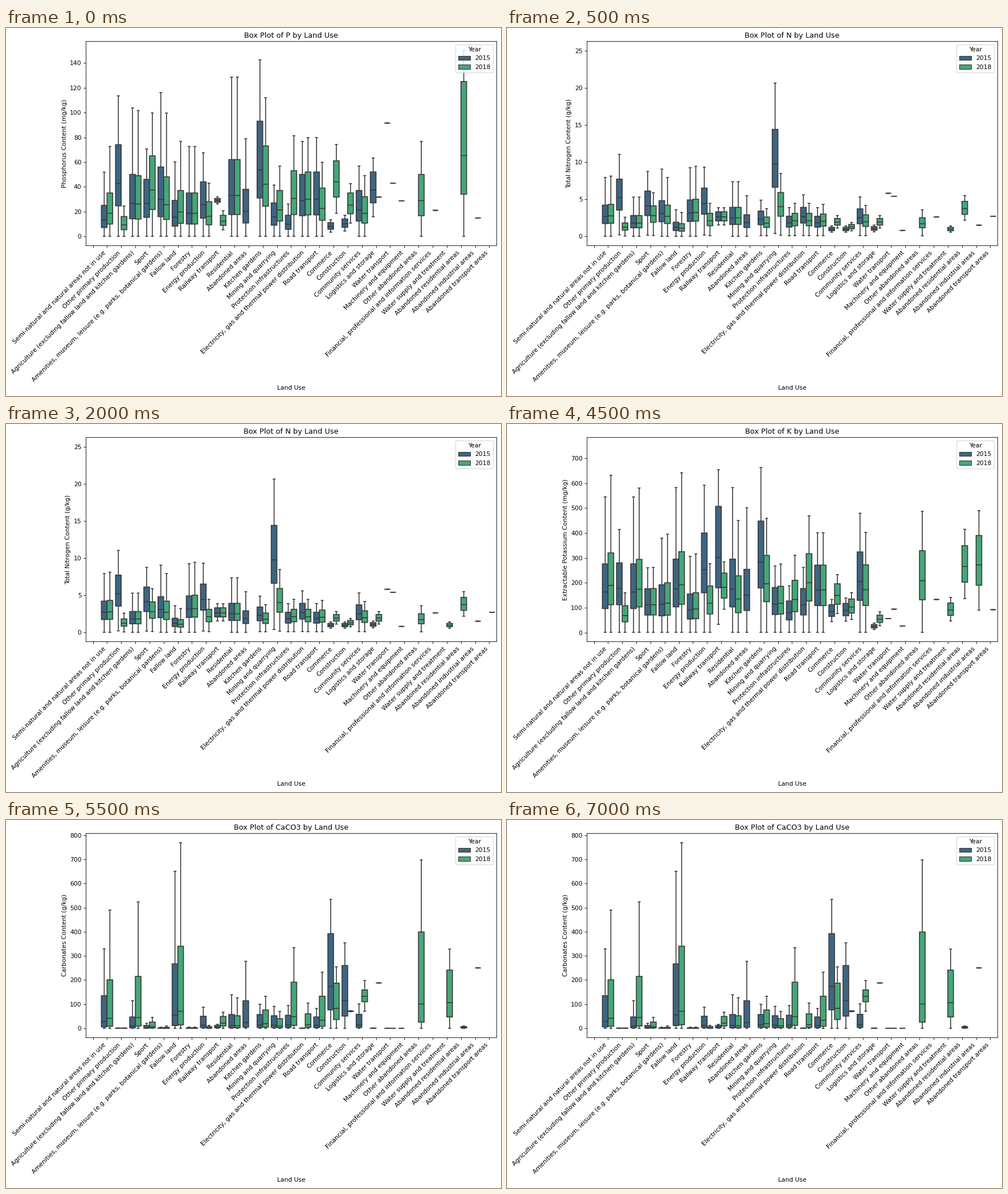
Recreate the animation shown at these times as a matplotlib script. Size 869 by 645 pixels, loop 8000 ms.

```python
import math

import matplotlib.pyplot as plt
from matplotlib.animation import FuncAnimation
from matplotlib.patches import Patch

W, H, DPI = 869, 645, 77.5
LEFT, BOTTOM, AX_W, AX_H = 140.1, 263.6, 720.7, 358.0
BLUE, GREEN, INK = "#3d6682", "#45a778", "#393939"

# How many samples a land use has decides the shape of its box:
# lower quartile as a share of the upper one, whisker reach in box heights.
MANY, SOME, FEW, ONE = (0.35, 1.5), (0.4, 0.8), (0.58, 0.45), (1.0, 0.5)

LAND_USES = [
    ("", ONE),
    ("Semi-natural and natural areas not in use", MANY),
    ("Other primary production", SOME),
    ("Agriculture (excluding fallow land and kitchen gardens)", MANY),
    ("Sport", SOME),
    ("Amenities, museum, leisure (e.g. parks, botanical gardens)", MANY),
    ("Fallow land", MANY),
    ("Forestry", MANY),
    ("Energy production", SOME),
    ("Railway transport", FEW),
    ("Residential", MANY),
    ("Abandoned areas", MANY),
    ("Kitchen gardens", SOME),
    ("Mining and quarrying", SOME),
    ("Protection infrastructures", SOME),
    ("Electricity, gas and thermal power distribution", SOME),
    ("Road transport", SOME),
    ("Commerce", FEW),
    ("Construction", FEW),
    ("Community services", SOME),
    ("Logistics and storage", FEW),
    ("Water transport", ONE),
    ("Machinery and equipment", ONE),
    ("Other abandoned areas", SOME),
    ("Financial, professional and information services", ONE),
    ("Water supply and treatment", FEW),
    ("Abandoned residential areas", FEW),
    ("Abandoned industrial areas", ONE),
    ("Abandoned transport areas", ONE),
]
NAMES = [name for name, _ in LAND_USES]
NO = None

# symbol, y label, lowest and highest value, skew, then the upper quartiles
# of 2015 and 2018 in the order of LAND_USES; a pair gives both quartiles.
PANELS = [
    ("P", "Phosphorus Content (mg/kg)", 0, 150, 1.2,
     [NO, 25, 74, 50, 46, 56, 29, 35, 44, (27.5, 30.5), 62, 38, 93, 27, 17,
      50, 52, 11, 14, 37, 52, 91.5, 28.7],
     [NO, 35, 16, 49, 65, 48, 37, 35, 28, 17, 62, NO, 73, 37, 53,
      52, 39, 61, 35, 32, (31.7, 31.7), 43, NO, 50, 21, NO, (34, 125), 14.7]),
    ("N", "Total Nitrogen Content (g/kg)", 0, 25, 0.85,
     [NO, 4.2, 7.7, 2.8, 6.1, 4.8, 1.9, 4.9, 6.5, 3.3, 3.9, 2.9, 3.4, 14.4,
      2.7, 3.9, 2.7, 1.2, 1.2, 3.7, 1.3, 5.8, 0.8],
     [NO, 4.3, 1.8, 2.8, 4.1, 4.2, 1.7, 5, 3.1, 3.3, 3.9, NO, 2.6, 5.9,
      3.1, 3.1, 3, 2.4, 1.6, 2.9, 2.4, 5.4, NO, 2.5, 2.6, 1.2, 4.7, 1.5, 2.7]),
    ("K", "Extractable Potassium Content (mg/kg)", 1, 747, 1,
     [NO, 276, 280, 276, 176, 192, 295, 155, 400, (180, 507), 295, 254, 448,
      181, 127, 177, 271, 112, 117, 324, 32, 56, 26],
     [NO, 320, 108, 294, 177, 200, 325, 160, 187, 239, 228, NO, 310,
      186, 210, 317, 271, 196, 135, 272, 70, 94, NO, 329, 133, 119, 349,
      (190, 390), 92]),
    ("CaCO3", "Carbonates Content (g/kg)", 0, 769, 3,
     [NO, 135, 1, 47, 12, 2, 267, 2, 50, 12, 57, 114, 57, 52, 54,
      1, 47, 392, 260, 58, 1, 0, 0],
     [NO, 201, 1, 215, 26, 4, 340, 2, 7, 49, 52, NO, 76, 40, 191,
      60, 133, 187, (70, 72), (110, 159), (188, 188), 0, NO, 399, NO, 241, 7,
      250]),
]


def box_stats(upper, kind, skew, bottom, peak):
    """Log-normal box: the median is the geometric mean of the quartiles."""
    share, reach = kind
    if isinstance(upper, tuple):
        q1, q3 = upper
    else:
        q1, q3 = upper * share ** skew, upper
    tail = reach * (q3 - q1)
    return dict(q1=q1, q3=q3, med=math.sqrt(q1 * q3),
                whislo=max(q1 - tail, bottom), whishi=min(q3 + tail, peak))


def draw_boxes(ax, uppers, shift, color, skew, bottom, peak):
    stats, spots = [], []
    for i, upper in enumerate(uppers):
        if upper is not NO:
            stats.append(box_stats(upper, LAND_USES[i][1], skew, bottom, peak))
            spots.append(i + shift)
    line = dict(color=INK, linewidth=1.5, solid_capstyle="butt", snap=False)
    ax.bxp(stats, positions=spots, widths=0.4, capwidths=0.2,
           patch_artist=True, showfliers=False, manage_ticks=False,
           boxprops=dict(facecolor=color, edgecolor=INK, linewidth=1.5,
                         snap=False),
           medianprops=line, whiskerprops=line, capprops=line)


def make_panel(symbol, ylabel, bottom, peak, skew, first, second):
    ax = fig.add_axes([LEFT / W, BOTTOM / H, AX_W / W, AX_H / H], label=symbol)
    draw_boxes(ax, first, -0.2, BLUE, skew, bottom, peak)
    draw_boxes(ax, second, 0.2, GREEN, skew, bottom, peak)
    margin = 0.05 * (peak - bottom)
    ax.set_xlim(-0.5, len(NAMES) - 0.5)
    ax.set_ylim(bottom - margin, peak + margin)
    ax.set_xticks(range(len(NAMES)), NAMES, rotation=45, ha="right")
    ax.set_title(f"Box Plot of {symbol} by Land Use")
    ax.set_xlabel("Land Use")
    ax.set_ylabel(ylabel)
    keys = [Patch(facecolor=c, edgecolor=INK, label=year)
            for c, year in ((BLUE, "2015"), (GREEN, "2018"))]
    ax.legend(handles=keys, title="Year", loc="upper right")
    return ax


def update(step):
    # The first panel holds one step, the others five each.
    current = (step + 4) // 5
    for i, ax in enumerate(axes):
        ax.set_visible(i == current)
    return axes


plt.rcParams["font.family"] = "DejaVu Sans"
# The tiny surplus keeps the pixel size from rounding down.
fig = plt.figure(figsize=((W + 1e-6) / DPI, (H + 1e-6) / DPI), dpi=DPI,
                 facecolor="white")
axes = [make_panel(*panel) for panel in PANELS]
update(0)
anim = FuncAnimation(fig, update, frames=16, interval=500, repeat=True,
                     repeat_delay=0, blit=False)
plt.show()
```
